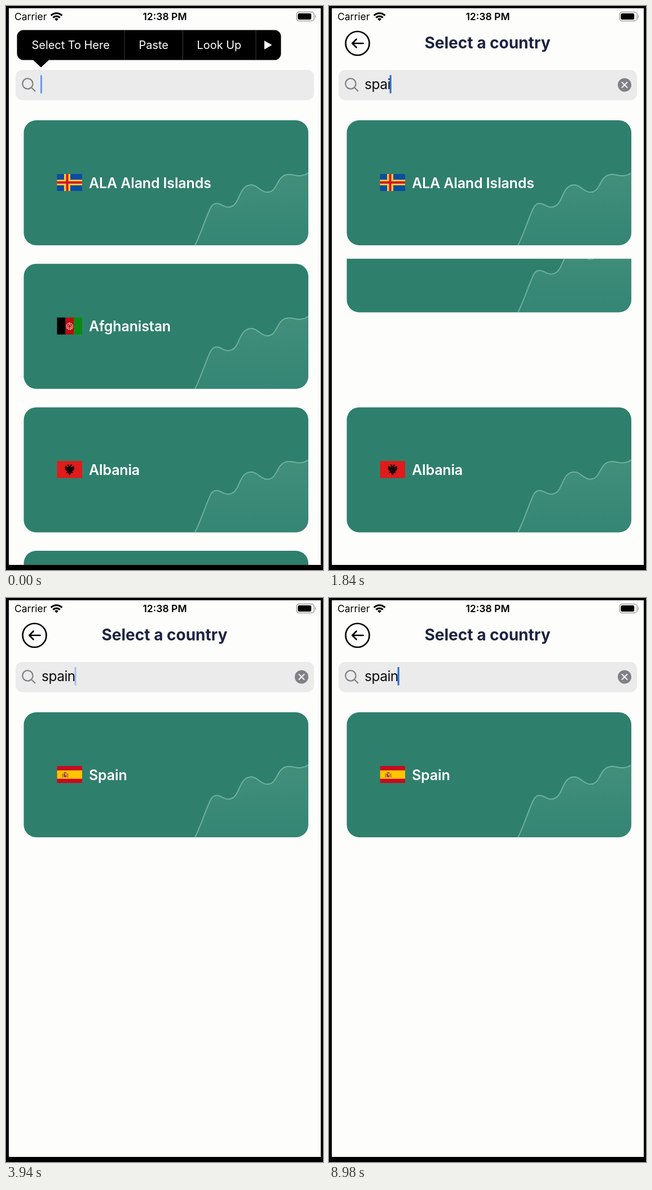
Recreate the animation shown at these times as an HTML page. Size 562x997 px, loop 9000 ms.

```html
<!DOCTYPE html>
<html lang="en">
<head>
<meta charset="utf-8">
<title>Country search</title>
<style>
  html, body { margin: 0; width: 100%; height: 100%; overflow: hidden; background: #000; }
  svg { display: block; width: 562px; height: 997px; font-family: Inter, Roboto, sans-serif; }
  .label { font-size: 25px; font-weight: 600; letter-spacing: -.15px; fill: #fff; }
  .menu text { font-size: 20px; letter-spacing: -.05px; fill: #fff; }
  .status { font-size: 17.5px; }
  .title { font-size: 28px; font-weight: 700; fill: #1c2340; }
  .query { font-size: 24.5px; letter-spacing: -.5px; fill: #0c0c0e; }
</style>
</head>
<body>
<svg viewBox="0 0 562 997">
  <defs>
    <linearGradient id="area" x2="0" y2="1"><stop stop-color="#8fd0b4" stop-opacity=".2"/><stop offset="1" stop-color="#6cc0b4" stop-opacity=".1"/></linearGradient>
  </defs>

  <rect width="562" height="997" fill="#fdfdfb"/>
  <g id="list"></g>

  <text class="status" x="15" y="25">Carrier</text>
  <g fill="none" stroke="#000" stroke-width="3.2">
    <path d="M79.8 16.8a13.6 13.6 0 0 1 19.4 0M83.4 20.6a8.6 8.6 0 0 1 12.2 0"/>
    <path d="M89.5 26.5l-3.4-3.6a4.8 4.8 0 0 1 6.8 0z" fill="#000" stroke="none"/>
  </g>
  <text class="status" x="281.5" y="25" text-anchor="middle" font-weight="600">12:38 PM</text>
  <rect x="515.2" y="10.7" width="31" height="15.6" rx="4.5" fill="none" stroke="#8b8b8b" stroke-width="1.2"/>
  <rect x="517.4" y="13" width="23.8" height="11" rx="2.5"/>
  <path d="M548 15.5q2.4 3 0 6z" fill="#8b8b8b"/>

  <g fill="none" stroke="#000" stroke-width="2.7" stroke-linecap="round" stroke-linejoin="round">
    <circle cx="50.5" cy="66" r="21"/><path d="M60.5 66H42M48.5 58.8L41.3 66l7.2 7.2"/>
  </g>
  <text class="title" x="281" y="75" text-anchor="middle">Select a country</text>

  <rect x="17" y="113" width="529" height="53.5" rx="12" fill="#ebebeb"/>
  <g fill="none" stroke="#808086" stroke-width="2.3" stroke-linecap="round">
    <circle cx="38.4" cy="137.4" r="9.2"/><path d="M45.2 144.2l6 6"/>
  </g>
  <text class="query" id="query" x="63" y="147"></text>
  <rect id="caret" y="122" width="3" height="32.5" rx="1.2" fill="#1a6be6"/>
  <g id="clear">
    <circle cx="524" cy="139.5" r="12" fill="#808087"/>
    <path d="M519.5 135l9 9m0-9l-9 9" stroke="#f4f4f4" stroke-width="2.1" stroke-linecap="round"/>
  </g>

  <g id="menu" class="menu">
    <path d="M31 42.5H476a11.5 11.5 0 0 1 11.5 11.5V84a11.5 11.5 0 0 1-11.5 11.5H76L62 108.5 48 95.5H31A11.5 11.5 0 0 1 19.5 84V54A11.5 11.5 0 0 1 31 42.5z"/>
    <g id="items">
      <path d="M210 43v52M313.5 43v52M443 43v52" stroke="#3c3c3c"/>
      <text x="45.5" y="76">Select To Here</text>
      <text x="235.5" y="76">Paste</text>
      <text x="338.5" y="76">Look Up</text>
      <path d="M458 61.3l13.5 7.7-13.5 7.7z" fill="#fff"/>
    </g>
  </g>

  <path d="M0 0H562V997H0zM5 4V988H558V4z" fill-rule="evenodd"/>
</svg>

<script>
const LOOP = 9000, TOP = 193, ROW = 253.7, PAD = 9;
const $ = id => document.getElementById(id);
const clamp = v => Math.min(1, Math.max(0, v));
const ease = v => { const u = clamp(v); return u * u * (3 - 2 * u); };
const box = (x, y, w, h, fill) => `<rect x="${x}" y="${y}" width="${w}" height="${h}" fill="${fill}"/>`;

// Flags are drawn in a 44.5 x 30 box
const flags = {
  aland: box(0, 0, 44.5, 30, '#0a4da2') + box(12.5, 0, 11, 30, '#ffc72c') + box(0, 10, 44.5, 10, '#ffc72c')
    + box(16, 0, 4, 30, '#d21034') + box(0, 13, 44.5, 4, '#d21034'),
  afghan: box(0, 0, 15, 30, '#000') + box(15, 0, 14.8, 30, '#be0a0a') + box(29.8, 0, 14.7, 30, '#0b8a12')
    + '<circle cx="22.3" cy="15.5" r="5.6" fill="none" stroke="#f3dcdc" stroke-width="1.3" stroke-dasharray="2.4 .7"/>'
    + '<path d="M19.5 18.5v-4l2.8-2.5 2.8 2.5v4zM22.3 9v3" fill="none" stroke="#f3dcdc"/>',
  albania: box(0, 0, 44.5, 30, '#e01b1b')
    + '<path d="M22.3 9l-2-3.2-3.2 1.4 2 1 .7 2.8-5.8-2.6 1 3-1.8.6 2 2-1.6 1.2 2.6 1-1 1.6 3-.4-2.2 4 3.2-1 .8 2 2.3 2.4 2.3-2.4.8-2 3.2 1-2.2-4 3 .4-1-1.6 2.6-1-1.6-1.2 2-2-1.8-.6 1-3-5.8 2.6.7-2.8 2-1-3.2-1.4z" fill="#190505"/>',
  algeria: box(0, 0, 22.2, 30, '#08703a') + box(22.2, 0, 22.3, 30, '#fff')
    + '<path d="M27 10.5a7 7 0 1 0 0 9 5.6 5.6 0 1 1 0-9z" fill="#d21034"/>',
  spain: box(0, 0, 44.5, 30, '#c60b1e') + box(0, 7.7, 44.5, 14.8, '#ffc400')
    + box(9, 13, 1.6, 7.5, '#9b6b52') + box(18.2, 13, 1.6, 7.5, '#9b6b52')
    + '<path d="M11.6 13.5h5.6v4.8q-2.8 4-5.6 0z" fill="#b23a2c"/>' + box(12.2, 10.8, 4.4, 2, '#a05a18') + box(14.4, 14, 2.5, 2.5, '#d9b5a5')
};

// All motion is measured in ticks of 1/60 s
const TICK = 1000 / 60, SLIDE = 18, CLEARED = 42, FOUND = 46, BLINK = 49;
const keys = [21, 25, 29, 32, 46];

// Rows with a start tick slide up inside their cell until the list is cleared
const rows = [
  { name: 'ALA Aland Islands', flag: 'aland', cell: 0 },
  { name: 'Afghanistan', flag: 'afghan', cell: 1, start: 30.6 },
  { name: 'Albania', flag: 'albania', cell: 2 },
  { name: 'Algeria', flag: 'algeria', cell: 3, start: 24.8 },
  { name: 'Spain', flag: 'spain', cell: 0, result: true }
];
const curve = 'M303.5 221C313 203 321 177 330 157C335 146 341 146 347 148C354 151 360 156 369 152C382 147 382 120 398 115C413 111 418 126 430 127C449 129 448 102 463 97C474 93 480 99 490 98Q499 97 504.5 93';

$('list').innerHTML = rows.map((r, i) => `
  <clipPath id="cell${i}"><rect y="${TOP + ROW * r.cell}" width="562" height="${ROW}"/></clipPath>
  <g id="row${i}" clip-path="url(#cell${i})">
    <g id="card${i}">
      <rect width="504.5" height="221" rx="22" fill="#2f7f6d"/>
      <path d="${curve}V199a22 22 0 0 1-22 22z" fill="url(#area)"/>
      <path d="${curve}" fill="none" stroke="#8cc8b4" stroke-opacity=".65" stroke-width="2"/>
      <g transform="translate(59 95)">${flags[r.flag]}</g>
      <text class="label" x="115.5" y="119.5">${r.name}</text>
    </g>
  </g>`).join('');

// Uneven cadence: three ticks every 140 ms, shown for 20, 100 and 20 ms
function tickAt(t) {
  const p = t % 140;
  return 3 * Math.floor(t / 140) + (p >= 20) + (p >= 120);
}

// Solid while typing, otherwise a one-second blink with soft edges
function caretAlpha(k) {
  if (k >= keys[0] && k < BLINK) return 1;
  const ms = (k < BLINK ? k * TICK + 555 : (k - BLINK) * TICK) % 1000;
  return ms < 850 ? 1 - clamp((ms - 500) / 150) : (ms - 850) / 150;
}

function draw(t) {
  const k = tickAt(t);
  rows.forEach((r, i) => {
    const shift = r.start ? ease((k - r.start) / SLIDE) : 0;
    const shown = r.result ? k >= FOUND : k < CLEARED;
    $('row' + i).setAttribute('visibility', shown ? 'visible' : 'hidden');
    $('card' + i).setAttribute('transform', `translate(31.5 ${TOP + PAD + ROW * (r.cell - shift)})`);
  });
  const typed = 'spain'.slice(0, keys.filter(at => k >= at).length);
  $('query').textContent = typed;
  const width = typed ? $('query').getComputedTextLength() + .7 : 0;
  $('caret').setAttribute('x', 61 + width);
  $('caret').setAttribute('opacity', caretAlpha(k));
  $('clear').setAttribute('opacity', typed ? 1 : 0);
  const menu = 1 - ease((k - 21) / 17);
  $('menu').setAttribute('opacity', menu);
  $('items').setAttribute('opacity', menu);
}

const start = performance.now();
function loop() {
  draw((performance.now() - start) % LOOP);
  requestAnimationFrame(loop);
}
loop();
</script>
</body>
</html>
```
